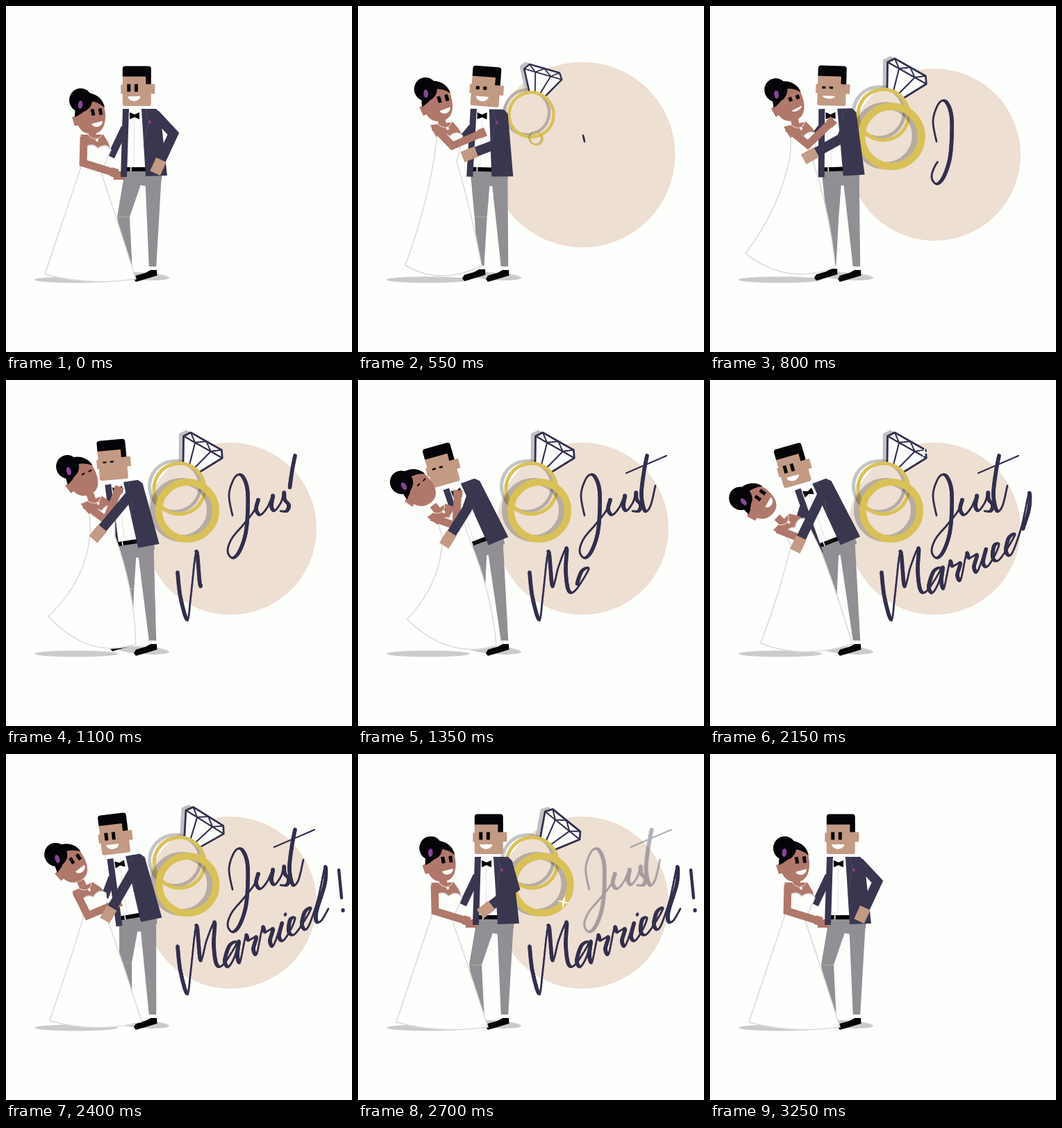
Recreate the animation shown at these times as an HTML page with a canvas. Size 498x498 px, loop 3300 ms.

```html
<!DOCTYPE html>
<html lang="en">
<head>
<meta charset="utf-8">
<title>Just Married!</title>
<style>
html, body { margin: 0; width: 100%; height: 100%; overflow: hidden; background: #fdfffd; }
canvas { display: block; width: 498px; height: 498px; }
</style>
</head>
<body>
<canvas id="stage" width="498" height="498" role="img" aria-label="Just Married!"></canvas>
<script>
const stage = document.getElementById('stage').getContext('2d');
const layer = document.createElement('canvas');
layer.width = layer.height = 498;
const sheet = layer.getContext('2d');
let ctx = stage;

const LOOP = 3300, STEP = 50;
const NAVY = '#39364f', INK = '#322f4c', GOLD = '#d9c157', BLACK = '#040307', WHITE = '#fdfffd';
const TAN = '#c39a84', BROWN = '#b0786a', GREY = '#918f94', BLUSH = '#eedfd3';
const VEIL = 'rgba(0,0,0,.23)', SHADOW = '#cbcbcc';

const clamp = v => Math.max(0, Math.min(1, v));
const span = (t, a, b) => clamp((t - a) / (b - a));
const smooth = v => v * v * (3 - 2 * v);
const lerp = (a, b, u) => a + (b - a) * u;
const bump = (t, a, b) => Math.sin(Math.PI * span(t, a, b));

// Eased value from [time, value] pairs.
function ramp(t, keys) {
  for (let i = 1; i < keys.length; i++) {
    const [a, va] = keys[i - 1], [b, vb] = keys[i];
    if (t < b) return lerp(va, vb, smooth(span(t, a, b)));
  }
  return keys[keys.length - 1][1];
}

// Beats: apart, embrace, kiss, dip, lift, part. Monotone cubic, back to the first value.
const BEATS = [50, 550, 1100, 1700, 2150, 2700, 3200];
function track(t, ...v) {
  v.push(v[0]);
  const last = BEATS.length - 1;
  t = Math.max(BEATS[0], Math.min(BEATS[last], t));
  let i = 0;
  while (i < last - 1 && t > BEATS[i + 1]) i++;
  const slope = j => (v[j + 1] - v[j]) / (BEATS[j + 1] - BEATS[j]);
  const tangent = j => {
    if (j === 0 || j === last) return 0;
    const a = slope(j - 1), b = slope(j);
    return a * b <= 0 ? 0 : 2 * a * b / (a + b);
  };
  const h = BEATS[i + 1] - BEATS[i], u = (t - BEATS[i]) / h, w = 1 - u;
  return lerp(v[i], v[i + 1], smooth(u)) + h * u * w * (w * tangent(i) - u * tangent(i + 1));
}

// Local to stage coordinates, turned around an origin.
function frame(ox, oy, deg) {
  const c = Math.cos(deg * Math.PI / 180), s = Math.sin(deg * Math.PI / 180);
  return (x, y) => [ox + x * c - y * s, oy + x * s + y * c];
}

// Elbow of a two-bone arm; side picks the way it bends.
function elbow([x1, y1], [x2, y2], a, b, side) {
  const dx = x2 - x1, dy = y2 - y1, d = Math.hypot(dx, dy);
  const along = (a * a - b * b + d * d) / (2 * d);
  const out = side * Math.sqrt(Math.max(0, a * a - along * along));
  return [x1 + (dx * along + dy * out) / d, y1 + (dy * along - dx * out) / d];
}

function trace(pts) {
  ctx.beginPath();
  for (let i = 0; i < pts.length; i += 2) ctx.lineTo(pts[i], pts[i + 1]);
}
function poly(pts, fill) {
  trace(pts);
  ctx.fillStyle = fill;
  ctx.fill();
}
function line(pts, width, color) {
  trace(pts);
  ctx.lineWidth = width;
  ctx.strokeStyle = color;
  ctx.stroke();
}
function oval(x, y, rx, ry, fill, turn = 0, end = Math.PI * 2) {
  ctx.beginPath();
  ctx.ellipse(x, y, rx, ry, turn, 0, end);
  ctx.fillStyle = fill;
  ctx.fill();
}
function box(x, y, w, h, fill, r = 0) {
  ctx.beginPath();
  ctx.roundRect(x, y, w, h, r);
  ctx.fillStyle = fill;
  ctx.fill();
}
function ring(r, width, color) {
  ctx.beginPath();
  ctx.arc(0, 0, r, 0, Math.PI * 2);
  ctx.lineWidth = width;
  ctx.strokeStyle = color;
  ctx.stroke();
}
function placed(x, y, deg, scale, draw) {
  ctx.save();
  ctx.translate(x, y);
  ctx.rotate(deg * Math.PI / 180);
  ctx.scale(scale, scale);
  draw();
  ctx.restore();
}

// Letters: pen points from the left end of the baseline; the last one is the advance.
const GLYPHS = {
  J: [6,-5, 1,-36, 9,-59, 19,-61, 27,-42, 28,-11, 25,23, 16,48, 6,56, -1,45, 5,28, 21,11, 37,-7],
  u: [6,-22, 3,-9, 9,0, 19,-9, 27,-25, 25,-10, 30,-3],
  s: [9,-14, 13,-27, 14,-17, 20,-8, 17,0, 8,-1],
  t: [21,-78, 16,-52, 13,-22, 18,1, 26,-5, 33,-33],
  M: [0,-65, 4,-28, 14,10, 19,-21, 27,-82, 33,-29, 42,-54, 53,-74, 52,-42, 56,-12, 66,-7],
  a: [19,-28, 9,-30, 2,-12, 7,0, 16,-10, 22,-29, 20,-10, 24,1],
  r: [8,-32, 12,-24, 23,-23, 19,-8, 24,1],
  i: [12,-25, 8,-8, 14,1],
  e: [11,-10, 17,-23, 10,-24, 8,-8, 16,0],
  d: [14,-12, 24,-26, 15,-25, 11,-8, 19,0, 33,-31, 44,-75, 44,-52, 32,-18, 32,-3, 39,-1, 49,-13]
};

// Smooth samples through the pen points.
function curve(p) {
  const n = p.length, out = [];
  const at = i => p[Math.max(0, Math.min(n - 1, i))];
  for (let i = 0; i < n - 1; i++) for (let u = 0; u < 1; u += .125) {
    out.push([0, 1].map(k => {
      const [a, b, c, d] = [-1, 0, 1, 2].map(j => at(i + j)[k]);
      return b + .5 * u * (c - a + u * (2 * a - 5 * b + 4 * c - d + u * (3 * (b - c) + d - a)));
    }));
  }
  return [...out, p[n - 1]];
}
function word(text, x, y, slope) {
  const pts = [], y0 = y - slope * x;
  for (const ch of text) {
    const g = GLYPHS[ch];
    for (let i = 0; i < g.length; i += 2) pts.push([x + g[i], y0 + slope * (x + g[i]) + g[i + 1]]);
    x += g[g.length - 2];
  }
  return curve(pts);
}
const strokes = {
  just: word('Jus', 320, 201, -.15),
  tee: word('t', 395, 190, -.15),
  bar: [[386, 134], [444, 109]],
  married: word('Married', 247, 342, -.49),
  bang: [[479, 167], [483, 207]]
};

// Downstrokes are thick, upstrokes thin.
function write(pts, part, thin = 2.7, thick = 2.9) {
  const len = i => Math.hypot(pts[i][0] - pts[i - 1][0], pts[i][1] - pts[i - 1][1]);
  let left = 0;
  for (let i = 1; i < pts.length; i++) left += len(i);
  left *= part;
  ctx.lineCap = 'round';
  for (let i = 1; i < pts.length && left > 0; i++) {
    const [x, y] = pts[i - 1], d = len(i) || 1, u = Math.min(1, left / d);
    const dx = pts[i][0] - x, dy = pts[i][1] - y;
    line([x, y, x + dx * u, y + dy * u], thin + thick * Math.max(0, dy / d), INK);
    left -= d;
  }
  ctx.lineCap = 'butt';
}

// Draws on a separate sheet so overlapping strokes fade as one.
function faded(alpha, shift, draw) {
  if (alpha <= 0) return;
  sheet.clearRect(0, 0, 498, 498);
  ctx = sheet;
  draw();
  ctx = stage;
  ctx.globalAlpha = alpha;
  ctx.drawImage(layer, shift, 0);
  ctx.globalAlpha = 1;
}

function lettering(t) {
  faded(1 - ramp(t, [[2550, 0], [2700, .62], [2800, 1]]), 9 * smooth(span(t, 2500, 2800)), () => {
    write(strokes.just, span(t, 540, 1040));
    write(strokes.tee, span(t, 1040, 1200));
    write(strokes.bar, span(t, 1200, 1300), 2.2);
  });
  faded(1 - span(t, 2780, 2980), 9 * smooth(span(t, 2740, 2980)), () => {
    write(strokes.married, span(t, 820, 2220));
    if (t >= 2200) oval(402, 231, 2.2, 2.8, INK, .3);
    write(strokes.bang, span(t, 2250, 2400), 1.8, 2.6);
    if (t >= 2400) oval(485, 225, 2.7, 3, INK);
  });
}

function gem(shadow) {
  const outline = [-14,-36, -32,-69, -25.5,-78.5, 25.5,-78.5, 32,-69, 14,-36];
  if (shadow) return poly(outline, '#c1bfc1');
  poly(outline, WHITE);
  ctx.lineJoin = 'round';
  line(outline, 2.8, INK);
  line([-32,-69, 32,-69], 2.2, INK);
  line([-25.5,-78.5, -13,-69, 0,-78.5, 13,-69, 25.5,-78.5], 2, INK);
  for (const side of [-1, 1]) line([13 * side,-69, 4 * side,-36], 2.1, INK);
  ctx.lineJoin = 'miter';
}

function rings(t) {
  const size = ramp(t, [[300, 0], [550, .88], [700, 1.04], [800, 1], [2780, 1], [3050, 0]]);
  const turn = ramp(t, [[300, 0], [550, 16], [800, 29.5], [2250, 29.5], [2700, 39], [3050, 48]]);
  const size2 = ramp(t, [[480, 0], [550, .22], [780, 1.06], [880, 1], [2820, 1], [3080, 0]]);
  const drift = 2 * smooth(span(t, 2300, 3000));
  if (size > 0) {
    placed(243 + drift, 153, turn, size, () => { gem(true); ring(36.5, 5, VEIL); });
    placed(249.5 + drift, 156.5, turn, size, () => { gem(); ring(36.5, 5, GOLD); });
  }
  if (size2 > 0) {
    const x = 256 + 5 * size2 + 3 * drift, y = 192 - 4 * size2;
    placed(x - 8 * size2, y - 1, 0, size2, () => ring(41, 10, VEIL));
    placed(x, y, 0, size2, () => ring(41, 10, GOLD));
  }
  sparkle(308, 104, 8 * bump(t, 2000, 2300));
  sparkle(296, 213, 10 * bump(t, 2550, 2830));
}

function sparkle(x, y, r) {
  const pts = [];
  for (let i = 0; i < 8; i++) {
    const d = i % 2 ? r * .25 : r, a = i * Math.PI / 4 + .2;
    pts.push(x + d * Math.cos(a), y + d * Math.sin(a));
  }
  poly(pts, '#fffdf0');
}

function limb([x1, y1], w1, [x2, y2], w2) {
  poly([x1 - w1 / 2, y1, x1 + w1 / 2, y1, x2 + w2 / 2, y2, x2 - w2 / 2, y2], GREY);
}
function shoe([x, y]) {
  box(x - 5, y - 2, 10, 9, WHITE);
  poly([x-27,y+18, x-24,y+13, x-10,y+9, x-3,y+5, x+6,y+5, x+6.5,y+13, x-10,y+18, x-24,y+22], BLACK);
}
function hand([x, y], from, w, h, color) {
  const deg = Math.atan2(y - from[1], x - from[0]) * 180 / Math.PI;
  placed(x, y, deg, 1, () => box(-w / 2, -h / 2, w, h, color));
}

// Everything the couple's rig hangs on at one moment.
function rig(t) {
  const near = track(t, 0, 1, 1, 1, 1, 0);
  const lean = track(t, 0, -1.5, 9, 34, 21, 0);
  const hip = [198 - 9 * near - .2 * lean, 245 - .3 * lean];
  const tip = track(t, 0, 8, 20, 57, 46, 1);
  const waist = [track(t, 122, 126, 139, 144, 138, 121), track(t, 236, 220, 221, 243, 241, 236)];
  return {
    t, near, lean, hip, tip, waist,
    torso: frame(...hip, -lean),
    body: frame(...waist, -tip),
    reach: track(t, 0, .7, 1, .9, .68, 0),
    kiss: track(t, 0, 0, 1, 1, 0, 0),
    doze: track(t, 0, .7, 1, .8, 0, 0)
  };
}

function groom({ near, lean, hip, torso, kiss, doze }) {
  const thigh = torso(-13, -4), seat = torso(14, -4);
  const far = [177, 374 - .6 * Math.max(0, lean)], ankle = [211, 375];
  const knee = [(thigh[0] + far[0]) / 2 - 12 * (1 - near), (thigh[1] + far[1]) / 2 - 4];
  shoe(far);
  limb(thigh, 29, knee, 18);
  limb(knee, 18, far, 9);
  shoe(ankle);
  limb(seat, 24, ankle, 10.5);

  line([...torso(-27, -70), ...torso(lerp(-47, -39, near), lerp(-28, -55, near))], 11, NAVY);
  box(hip[0] - 43 + 30 * near, hip[1] - 7 - 40 * near, 16, 12, BROWN);

  placed(...hip, -lean, 1, () => {
    poly([-26,-8, 27,-8, 26,6, 2,14, -25,8], GREY);
    poly([-22,-97, -2,-97, 3,-12, -24,-12], WHITE);
    box(-25, -13, 28, 6, BLACK);
    box(-19, -13, 1.5, 6, WHITE);
    line([-13,-85, -14,-13], .8, '#d9d9dc');
    poly([-30,-97, -21,-97, -24,1, -33,1], NAVY);
    poly([-3,-97, 18,-97, 24,-91, 34,-1, 3,0], NAVY);
    line([3,-97, 7,-78, 0,-45], .7, '#57536a');
    oval(9, -78, 1.8, 2.8, '#8d3f86', -.5);
    poly([-20,-92, -13,-89, -6,-92, -6,-82, -13,-85, -20,-82], BLACK);
  });

  // The head cranes forward about twice as far as the back bends.
  const crane = (10 + 1.9 * lean) * Math.PI / 180, neck = 27 + .27 * lean, [x, y] = torso(-5, -97);
  placed(x - neck * Math.sin(crane), y - neck * Math.cos(crane), 3 * near - .9 * lean, 1, () => {
    box(-23, -8, 6, 13, TAN);
    box(17, -9, 9, 14, TAN);
    box(-20.5, -22, 41, 44.5, TAN, 3);
    box(-20.5, -35, 41, 15, BLACK, [4, 4, 0, 0]);
    box(13, -22, 7.5, 13, BLACK);
    const open = 11 * (1 - .8 * doze);
    for (const ex of [-11.5, -1]) box(ex - 2.5, -3.5 - open / 2, 5, open, BLACK);
    oval(-4, 8.5, 9, 7 * (1 - kiss), WHITE, 0, Math.PI);
  });
}

function dress({ t, tip, waist, body }) {
  const half = 15 + .14 * tip, [wx, wy] = waist;
  const sway = 5 * bump(t, 50, 350) + 16 * bump(t, 650, 1100) + 5 * bump(t, 2700, 3200);
  const lx = track(t, 56, 68, 61, 87, 73, 55) - sway, ly = track(t, 386, 373, 340, 357, 379, 386);
  const rx = track(t, 187, 178, 187, 214, 205, 187), ry = track(t, 393, 374, 380, 384, 380, 393);
  const swish = .55 * (386 - ly);
  ctx.beginPath();
  ctx.moveTo(...body(-8, -33));
  ctx.quadraticCurveTo(...body(3, -40), ...body(10, -31));
  ctx.quadraticCurveTo(...body(22, -40), ...body(29, -29));
  ctx.lineTo(wx + half, wy + 4);
  ctx.quadraticCurveTo((wx + half + rx) / 2 + .5 * swish, (wy + ry) / 2, rx, ry);
  ctx.quadraticCurveTo((lx + rx) / 2 - 5, 403, lx, ly);
  ctx.quadraticCurveTo((wx - half + lx) / 2 + swish, (wy + ly) / 2 + .3 * swish, wx - half, wy - 2);
  ctx.closePath();
  ctx.fillStyle = WHITE;
  ctx.fill();
  ctx.lineWidth = 1.5;
  ctx.lineJoin = 'round';
  ctx.strokeStyle = '#dadada';
  ctx.stroke();
  ctx.lineJoin = 'miter';
}

function brideHead(kiss) {
  poly([-26,2, -15,-2, -12,12, -22,15], BROWN);
  ctx.beginPath();
  ctx.moveTo(-18, -10);
  ctx.lineTo(0, -27);
  ctx.lineTo(20, -14);
  ctx.bezierCurveTo(25, 6, 21, 25, 4, 26);
  ctx.bezierCurveTo(-10, 27, -18, 18, -19, 6);
  ctx.fillStyle = BROWN;
  ctx.fill();
  oval(-13.5, -22.5, 16.5, 17, BLACK);
  ctx.beginPath();
  ctx.moveTo(-22, 0);
  ctx.lineTo(-20, -30);
  ctx.bezierCurveTo(-2, -38, 18, -30, 21, -12);
  ctx.quadraticCurveTo(12, -20, 1, -21);
  ctx.quadraticCurveTo(-4, -6, -22, 2);
  ctx.fillStyle = BLACK;
  ctx.fill();
  oval(-14, -16, 3.3, 6, '#87459a', .1);
  const open = 9.4 * (1 - .8 * kiss);
  for (const [x, y] of [[4, -5], [15, -6]])
    placed(x, y, -9, 1, () => box(-2.5, -open / 2, 5, open, BLACK));
  placed(10, 9.5, -14, 1, () => oval(0, 0, 8, 6.5 * (1 - kiss), WHITE, 0, Math.PI));
}

function bride(r) {
  const { waist, tip, body, torso, near, reach, kiss } = r;
  placed(...waist, -tip, 1, () => {
    box(-3, -60, 11, 12, BROWN);
    poly([-15,-51, 18,-51, 25,-40, 29,-28, -8,-30], BROWN);
  });
  dress(r);
  placed(...waist, -tip, 1, () => {
    ctx.beginPath();
    ctx.moveTo(-5, -52);
    ctx.quadraticCurveTo(8, -37, 17, -52);
    ctx.lineWidth = 1;
    ctx.strokeStyle = '#f0dfd8';
    ctx.stroke();
    oval(9, -43, 2, 2.4, '#f6ebe6');
  });
  placed(...body(-1, -78 - .35 * tip), -tip, 1, () => brideHead(kiss));
  const shoulder = body(-10, -48), palm = torso(lerp(-42, -12, near), lerp(-5, -87, reach));
  const bend = elbow(shoulder, palm, 38, 47, -1);
  line([...shoulder, ...bend, ...palm], 11, BROWN);
  hand(palm, bend, 10, 13, BROWN);
}

function nearArm({ t, hip, torso }) {
  const shoulder = torso(17, -89);
  const palm = [hip[0] + track(t, 21, -29, -55, -56, -58, -14), hip[1] + track(t, -14, -32, -21, 4, -2, -21)];
  const bend = elbow(shoulder, palm, 38, 52, 1);
  const cuff = [0, 1].map(k => lerp(bend[k], palm[k], .8));
  line([...shoulder, ...bend, ...cuff], 14, NAVY);
  hand(palm, bend, 21, 16, TAN);
}

function draw(t) {
  ctx.fillStyle = WHITE;
  ctx.fillRect(0, 0, 498, 498);
  const r = ramp(t, [[100, 0], [500, 132], [575, 134], [750, 124], [2900, 124], [3200, 0]]);
  oval(323, 214, r, r, BLUSH);
  rings(t);
  lettering(t);
  oval(101, 394, 60, 4.6, SHADOW);
  oval(198, 389, 37, 5.5, SHADOW, .06);
  const pose = rig(t);
  groom(pose);
  bride(pose);
  nearArm(pose);
}

const start = performance.now();
function tick() {
  const t = Math.floor((Math.max(0, performance.now() - start) % LOOP) / STEP) * STEP;
  draw(t < 100 ? 0 : t);
  requestAnimationFrame(tick);
}
tick();
</script>
</body>
</html>
```
